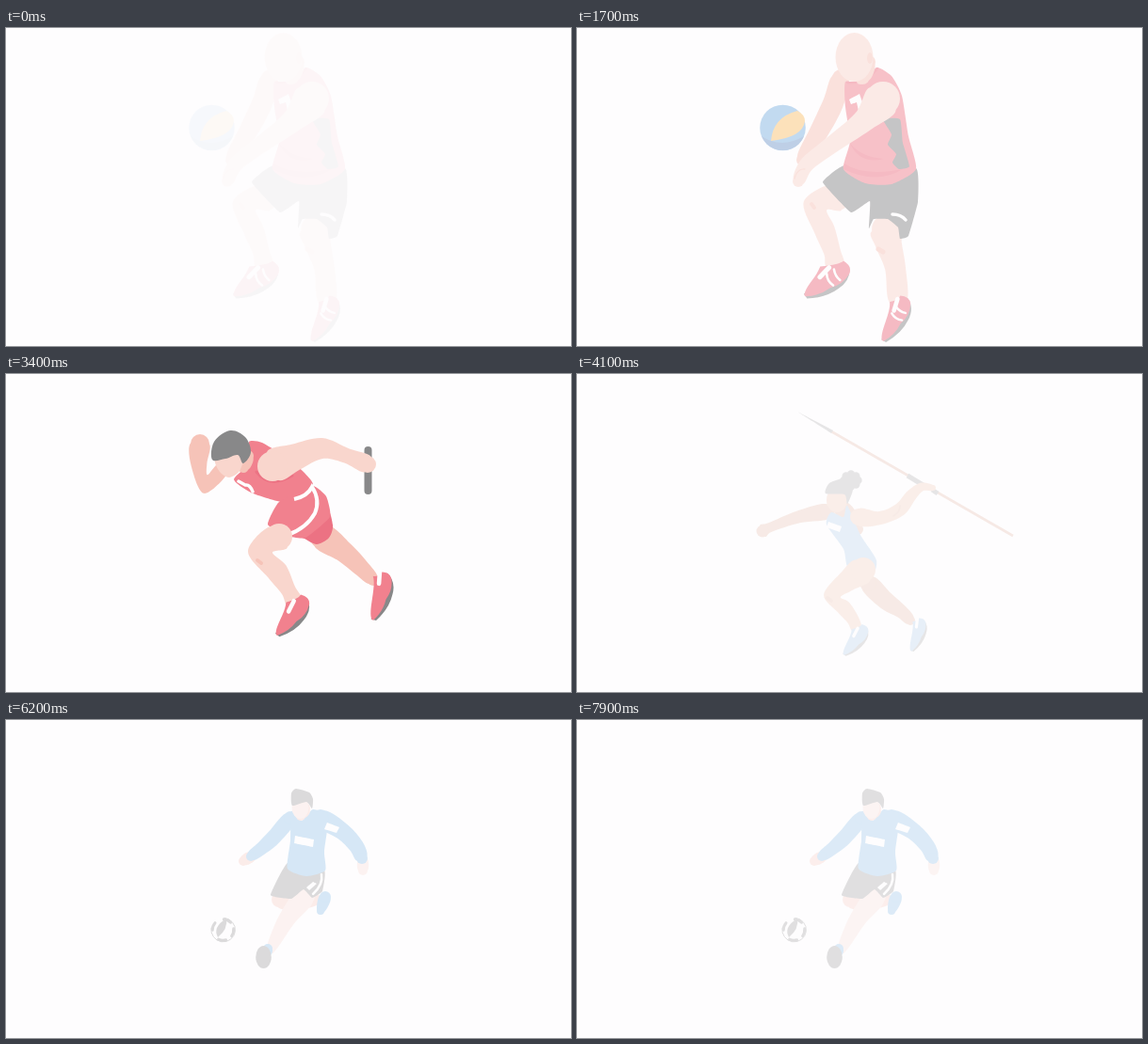
An HTML page for the animation above (8000 ms loop, 600x338 px).

```html
<!DOCTYPE html>
<html lang="en">
<head>
<meta charset="utf-8">
<title>Athletes</title>
<style>
html, body { margin: 0; width: 100%; height: 100%; overflow: hidden; background: #fefdfe; }
svg { display: block; width: 100vw; height: 100vh; }
</style>
</head>
<body>
<svg id="stage" viewBox="0 0 600 338"></svg>
<script>
const DARK = '#434344', RED = '#ea384d', DEEP = '#e2203b', WHITE = '#fff';
const SKIN = '#f7c0b1', SHADE = '#f2a290';
const BROWN = '#de875a', TAN = '#c66c3e', BLUE = '#4792d1', NAVY = '#2864ad';
const SHIRT = '#2589d4', PALE = '#f5c6b8';

const parse = text => text.split(' ').map(item => item.split(',').map(Number));
const path = (fill, d) => `<path d="${d}" fill="${fill}"/>`;
const disc = (fill, x, y, rx, ry = rx) =>
  `<ellipse cx="${x}" cy="${y}" rx="${rx}" ry="${ry}" fill="${fill}"/>`;
const line = (color, width, d, cap = 'round') =>
  `<path d="${d}" fill="none" stroke="${color}" stroke-width="${width}" stroke-linecap="${cap}"/>`;

// Closed curve through a few points; roundness 0 gives straight sides.
function shape(fill, points, roundness = 0.14) {
  const p = Array.isArray(points) ? points : parse(points);
  const at = i => p[(i + p.length) % p.length];
  const curves = p.map((b, i) => {
    const a = at(i - 1), c = at(i + 1), e = at(i + 2);
    const c1 = b.map((v, k) => v + (c[k] - a[k]) * roundness);
    const c2 = c.map((v, k) => v - (e[k] - b[k]) * roundness);
    return `C${c1} ${c2} ${c}`;
  });
  return path(fill, `M${p[0]}${curves.join('')}Z`);
}

// Tapered limb along joints given as x,y,radius.
function limb(fill, text) {
  const joints = parse(text), last = joints.length - 1;
  const side = sign => joints.map(([x, y, r], i) => {
    const from = joints[Math.max(i - 1, 0)], to = joints[Math.min(i + 1, last)];
    const angle = Math.atan2(to[1] - from[1], to[0] - from[0]) + sign * Math.PI / 2;
    return [x + r * Math.cos(angle), y + r * Math.sin(angle)];
  });
  const outline = [...side(1), ...side(-1).reverse()];
  return shape(fill, outline, 0.16) + disc(fill, ...joints[0]) + disc(fill, ...joints[last]);
}

// Shoe seen from the side, toe to the left; instep is where the tongue meets the ankle.
function shoe(color, x, y, angle, size, instep, striped = false) {
  const stripes = striped ? line(WHITE, 2.6, 'M3 -6Q0 1 4 8M12 -7Q10 0 13 6') : '';
  return `<g transform="translate(${x} ${y}) rotate(${-angle}) scale(${size})">`
    + path(DARK, 'M-28 3L-27 9Q-8 17 8 13.5Q24 11 28 -3Z')
    + path(color, `M-28 4C-22 -4 ${instep - 9} -7 ${instep} -16Q20 -9 25 -11Q31 -2 25 4Q14 12 0 9Q-14 12 -28 6Z`)
    + line(WHITE, 5, `M${instep - 5} -6L${instep + 8} -11`) + stripes + '</g>';
}

const volleyball = [
  disc('#398ad0', 218.5, 106, 24.3),
  path('#2c66b0', 'M196 115Q217 129 241 115A24.3 24.3 0 0 1 196 115Z'),
  path('#faa21f', 'M206 120Q208 95 234 88Q242 92 242 99Q240 116 206 120Z'),
  limb(SHADE, '280,53,9 272,80,11 256,112,10 240,140,7'),
  limb(SKIN, '276,180,14 253,189,13 263,215,11 271,238,9 274,252,9'),
  line(SHADE, 4, 'M249 187L252 191'),
  limb(SKIN, '329,214,16 331,230,14 338,255,11 341,290,9.5'),
  line(SHADE, 5, 'M320 235L325 238'),
  shape(DARK, '284,146 261,164 291,196 311,184 310,213 315,203 330,203 341,212 343,224 352,221 362,185 360,149', .05),
  line(WHITE, 3.5, 'M335 198Q344 198 349 204'),
  shape(RED, '285,57 302,59 318,42 334,51 345,72 352,115 360,150 334,166 306,165 283,150 290,120 285,84', .1),
  path(DEEP, 'M284 144Q304 158 346 150Q318 167 283 150ZM289 121Q300 137 326 139Q300 146 289 121Z'),
  line(DEEP, 2.5, 'M287 58Q306 60 319 43'),
  shape(DARK, '325,97 343,97 346,122 353,147 342,150 335,143 339,134 330,124 334,113', .08),
  shape(WHITE, '289,76 300,70 305,84 299,88 297,79 291,81', 0),
  limb(SKIN, '325,75,18 304,99,12 268,126,9 244,145,8 235,163,6'),
  line(SHADE, 1.4, 'M231 160Q234 149 242 150'),
  limb(SHADE, '310,36,7 303,52,8'),
  disc(SKIN, 294.5, 31, 20, 26),
  disc(SHADE, 311, 32, 3, 6),
  shoe(DEEP, 265, 268, 25, 1, 0, true),
  shoe(DEEP, 337, 309, 52, .93, 12, true)
];

const sprinter = [
  limb(SHADE, '206,74,10 205,96,8.5 212,117,10 230,101,7'),
  limb(SHADE, '335,172,13 360,190,11 377,206,9 390,219,6'),
  line(DARK, 8, 'M384.5 81V124'),
  shape(RED, '258,72 272,73 304,93 326,117 305,135 288,135 260,126 242,112 260,93', .1),
  line(DEEP, 3, 'M266 104Q280 122 304 108'),
  shape(DEEP, '303,167 338,142 347,160 343,174 330,181 317,175'),
  shape(RED, '290,136 325,119 340,130 344,152 318,174 299,172 278,160', .08),
  line(WHITE, 4, 'M306 133Q320 130 325 120Q334 134 328 148Q319 164 299 171', 'butt'),
  line(WHITE, 3.5, 'M247 114L254 118Q259 117 262 125'),
  limb(SKIN, '283,98,16 308,88,14 336,79,11 362,87,8 384,96,9'),
  limb(SKIN, '290,173,14 270,189,13 288,210,11.5 300,230,8 306,242,8'),
  line(SHADE, 4, 'M267 198L271 201'),
  limb(SHADE, '257,87,6 252,99,6'),
  shape(SKIN, '222,91 236,83 252,86 248,103 237,110 227,104'),
  shape(DARK, '219,91 221,72 238,60 254,67 260,83 252,95 246,86 233,90', .17),
  shoe(RED, 303, 257, 42, .9, 6),
  shoe(RED, 396, 236, 65, .92, 18)
];

const curls = Array.from({ length: 8 }, (_, i) =>
  disc(DARK, 291 + 7.5 * Math.cos(i * Math.PI / 4), 113 + 6.5 * Math.sin(i * Math.PI / 4), 4.2));

const javelin = [
  limb(TAN, '266,146,8 235,152,6.5 205,163,5 197,167,6.5'),
  limb(TAN, '309,222,9 328,241,9.5 345,253,7 354,262,5'),
  line('#bf6037', 2.6, 'M270 61L463 172', 'butt'),
  shape(DARK, '234,40 272,60 270,63', 0),
  line(DARK, 5, 'M351 108L369 119M377 123L383 127', 'butt'),
  limb(TAN, '280,142,8 290,153,9 298,165,6'),
  shape(BLUE, '270,147 265,160 283,186 288,206 312,216 318,198 301,171 287,140 283,152', .12),
  shape(WHITE, '267,157 281,162 279,168 265,163', 0),
  limb(BROWN, '299,152,9 322,153,7 343,144,7 355,129,6 366,120,4.5 378,121,3'),
  line(TAN, 1.6, 'M336 151Q343 147 343 140'),
  limb(BROWN, '304,208,13 286,221,11 271,236,9 283,248,8 293,261,6.5 297,271,5'),
  line(TAN, 4, 'M266 238L270 241'),
  disc(BROWN, 276, 134, 11, 13),
  shape(DARK, '264,127 268,116 284,111 293,122 287,138 284,128', .12),
  disc(DARK, 291, 113, 8), ...curls,
  shoe(BLUE, 295, 283, 42, .68, 8),
  shoe(BLUE, 360.5, 277, 62, .64, 16)
];

const footballer = [
  disc(WHITE, 230.5, 223, 13),
  ...[-65, 15, 95, 200].map(turn =>
    `<g transform="translate(230.5 223) rotate(${turn})">${line(DARK, 3, 'M10.5 -4Q12 0 10.5 4')}</g>`),
  line(DARK, 1, 'M218 221A12.8 12.8 0 1 0 232 210.3'),
  path(DARK, 'M234 211Q236 222 225 231Q219 220 234 211Z'),
  limb(SHADE, '262,144,5 252,150,5'),
  limb(PALE, '379,148,5 379,160,5'),
  limb(SHADE, '290,191,8 308,194,8 331,191,5'),
  limb(SHIRT, '339,188,6 334,203,4'),
  limb(PALE, '318,187,10 298,212,9 281,244,4.5'),
  shape(DARK, '299,152 281,186 303,190 316,180 325,189 336,182 338,160', .06),
  line(WHITE, 2.5, 'M335 164Q337 175 326 185'),
  shape(WHITE, '319,178 326,172 330,174 322,181', 0),
  limb(SHIRT, '302,104,7 285,124,8 272,136,7 260,145,5'),
  limb(SHIRT, '334,104,9 358,119,9 372,134,8 378,147,6'),
  shape(SHIRT, '303,97 314,107 326,95 342,103 338,140 339,160 319,166 299,158 302,128', .1),
  shape(WHITE, '307,123 327,127 326,135 306,131', 0),
  shape(WHITE, '341,109 354,114 351,120 338,116', 0),
  limb(SHADE, '316,94,7 313,102,5'),
  disc(PALE, 312.5, 93, 9, 12),
  shape(DARK, '304,91 303,78 308,73 322,77 326,84 325,94 319,87', .1),
  limb(SHIRT, '278,243,5 276,250,4'),
  disc(DARK, 273.5, 252, 8.3, 12)
];

const FADE = 1020;
const figures = [[volleyball, 985], [sprinter, 3020], [javelin, 4995], [footballer, 7035]];
const stage = document.getElementById('stage');
stage.innerHTML = figures.map(([parts]) => `<g>${parts.join('')}</g>`).join('');
const groups = [...stage.children];

function render(ms) {
  const t = Math.floor(ms % 8000 / 100) * 100;
  figures.forEach(([, peak], i) => {
    const opacity = Math.max(0, 1 - Math.abs(t - peak) / FADE);
    groups[i].setAttribute('opacity', opacity);
  });
}

const start = performance.now();
function tick() {
  render(performance.now() - start);
  requestAnimationFrame(tick);
}
tick();
</script>
</body>
</html>
```
